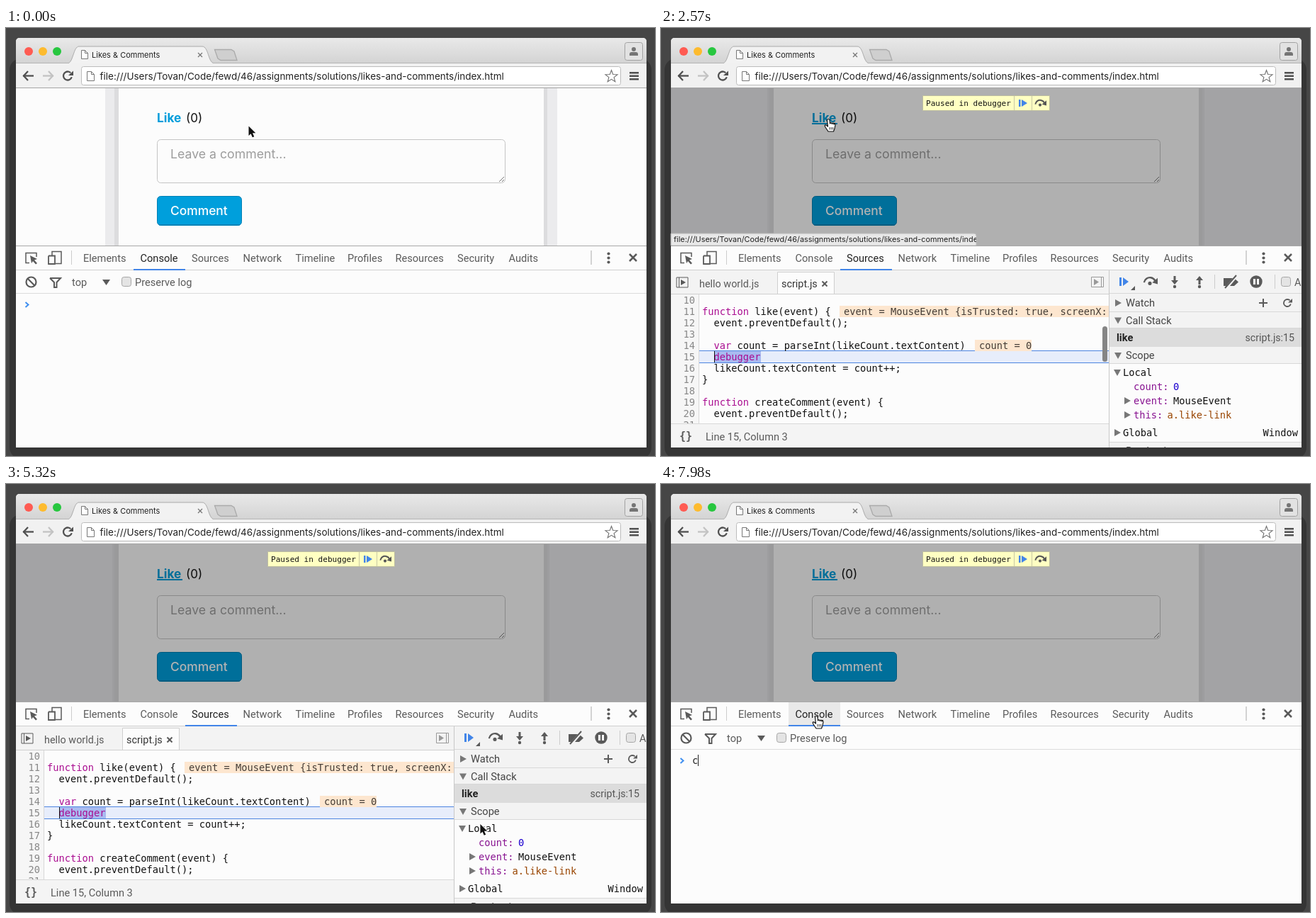
Animation, 916 px wide and 604 px high, one loop 8 s. Source, as an HTML page with a canvas:

```html
<!DOCTYPE html>
<html lang="en">
<head>
<meta charset="utf-8">
<title>Debugger walkthrough</title>
<style>
html, body { margin: 0; width: 100%; height: 100%; overflow: hidden; background: #464646; }
canvas { display: block; width: 916px; height: 604px; }
</style>
</head>
<body>
<canvas id="stage" width="916" height="604"></canvas>
<script>
const ctx = document.getElementById('stage').getContext('2d');
const LOOP = 8000, STEP = 88.66;
const INTER = 'Inter, sans-serif', UI = 'Roboto, sans-serif', MONO = '"DejaVu Sans Mono", monospace';
const GREY = '#5a5a5a', INK = '#303030', PURPLE = '#aa0d91', BLUE = '#4285e8';
const FOLDER = 'file:///Users/Tovan/Code/fewd/46/assignments/solutions/likes-and-comments/';
const SHORT_URL = '/Users/Tovan/Code/fewd/46/…/index.html';

// Pointer path: time, x, y
const PATH = [
  [0, 342, 138], [80, 348, 138], [170, 353, 140], [430, 353, 140], [520, 354, 127],
  [610, 354, 127], [1140, 237, 127], [3100, 237, 127], [3970, 128, 450], [4150, 136, 451],
  [4240, 138, 451], [4420, 720, 494], [5230, 720, 494], [5670, 203, 348],
  [5760, 203, 348], [6110, 220, 326], [LOOP, 220, 326]
];

const clamp = v => Math.max(0, Math.min(1, v));
const inside = (p, x0, y0, x1, y1) => p.x >= x0 && p.x < x1 && p.y >= y0 && p.y < y1;

function pointerAt(t) {
  const i = Math.max(1, PATH.findIndex(p => p[0] > t));
  const [t0, x0, y0] = PATH[i - 1], [t1, x1, y1] = PATH[i];
  const k = clamp((t - t0) / (t1 - t0)), e = k * k * (3 - 2 * k);
  return { x: x0 + (x1 - x0) * e, y: y0 + (y1 - y0) * e };
}

function rect(x, y, w, h, fill) { ctx.fillStyle = fill; ctx.fillRect(x, y, w, h); }

function box(x, y, w, h, r, fill, stroke) {
  ctx.beginPath();
  ctx.roundRect(x, y, w, h, r);
  if (fill) { ctx.fillStyle = fill; ctx.fill(); }
  if (stroke) { ctx.strokeStyle = stroke; ctx.lineWidth = 1; ctx.stroke(); }
}

function trace(points, closed) {
  ctx.beginPath();
  for (let i = 0; i < points.length; i += 2) ctx.lineTo(points[i], points[i + 1]);
  if (closed) ctx.closePath();
}

function poly(points, fill) { trace(points, true); ctx.fillStyle = fill; ctx.fill(); }

function line(points, color, width = 1) {
  trace(points);
  ctx.strokeStyle = color; ctx.lineWidth = width; ctx.stroke();
}

function arc(x, y, r, color, width, from = 0, to = Math.PI * 2) {
  ctx.beginPath(); ctx.arc(x, y, r, from, to);
  ctx.strokeStyle = color; ctx.lineWidth = width; ctx.stroke();
}

function dot(x, y, r, color) {
  ctx.beginPath(); ctx.arc(x, y, r, 0, Math.PI * 2); ctx.fillStyle = color; ctx.fill();
}

function text(s, x, y, size, family, color, weight = 400, align = 'left') {
  ctx.font = `${weight} ${size}px ${family}`;
  ctx.textAlign = align; ctx.fillStyle = color;
  ctx.fillText(s, x, y);
}

const ui = (s, x, y, color = GREY, size = 14.6, weight = 400, align = 'left') =>
  text(s, x, y, size, UI, color, weight, align);
const mono = (s, x, y, color = '#111', align = 'left') => text(s, x, y, 13.73, MONO, color, 400, align);

function code(s, x, y) {
  for (const part of s.split(/(function|var|debugger)/)) {
    mono(part, x, y, /^(function|var|debugger)$/.test(part) ? PURPLE : '#111');
    x += ctx.measureText(part).width;
  }
}

function clipped(x, y, w, h, draw) {
  ctx.save();
  ctx.beginPath(); ctx.rect(x, y, w, h); ctx.clip();
  draw();
  ctx.restore();
}

function cross(x, y, r, color, width) {
  line([x - r, y - r, x + r, y + r], color, width);
  line([x - r, y + r, x + r, y - r], color, width);
}

function triangle(x, y, open, color = '#777') {
  poly(open ? [x - 5, y - 4, x + 5, y - 4, x, y + 5] : [x - 4, y - 5, x + 5, y, x - 4, y + 5], color);
}

function reload(x, y, r, color, width) {
  arc(x, y, r, color, width, .3, 5.5);
  poly([x + r + 2, y - r - 1, x + r + 2, y - .5, x + 1, y - .5], color);
}

function page(x, y, w, h) {
  trace([x, y, x + w - 4, y, x + w, y + 4, x + w, y + h, x, y + h], true);
  ctx.fillStyle = '#fff'; ctx.fill();
  ctx.strokeStyle = '#777'; ctx.lineWidth = 1; ctx.stroke();
  line([x + w - 4, y, x + w - 4, y + 4, x + w, y + 4], '#777');
}

function checkbox(x, y) { box(x + .5, y + .5, 13, 13, 3, '#e4e4e4', '#a5a5a5'); }

function stepOver(x, y, s, color) {
  arc(x, y + 4 * s, 7.5 * s, color, 2.2 * s, Math.PI * 1.05, Math.PI * 1.85);
  poly([x + 10 * s, y - 3 * s, x + 10 * s, y + 5 * s, x + 3 * s, y + 3 * s], color);
  dot(x, y + 4 * s, 2.3 * s, color);
}

function play(x, y, color) {
  rect(x, y - 6, 3, 12, color);
  poly([x + 5, y - 6, x + 13, y, x + 5, y + 6], color);
}

function drawChrome() {
  rect(0, 0, 916, 604, '#464646');
  box(5, 43, 906, 565, 16, '#353535');
  const bar = ctx.createLinearGradient(0, 14, 0, 50);
  bar.addColorStop(0, '#e9e9e9'); bar.addColorStop(1, '#d3d3d3');
  box(14, 14, 890, 578, 5, '#fcfcfc');
  box(14, 14, 890, 37, [5, 5, 0, 0], bar);
  dot(32, 33, 6, '#ff5b52'); dot(52, 33, 6, '#fdbb2e'); dot(72, 33, 6, '#27c73f');
  rect(14, 49, 890, 1, '#b5b5b5');

  ctx.beginPath();
  ctx.moveTo(87, 50);
  ctx.bezierCurveTo(95, 49, 95, 26, 103, 26);
  ctx.lineTo(277, 26);
  ctx.bezierCurveTo(286, 26, 285, 49, 294, 50);
  ctx.fillStyle = '#f2f2f2'; ctx.fill();
  ctx.strokeStyle = '#aaa'; ctx.lineWidth = 1; ctx.stroke();
  page(106.5, 31.5, 9, 12);
  text('Likes & Comments', 121, 42, 11, INTER, '#222');
  cross(274, 38, 3, '#777', 1.3);

  trace([298, 30.5, 318, 30.5, 322, 33, 326, 45.5, 303, 45.5, 299, 43, 294.5, 30.5], true);
  ctx.fillStyle = '#cfcfcf'; ctx.fill(); ctx.strokeStyle = '#aaa'; ctx.stroke();
  box(873.5, 20.5, 25, 25, 3, '#e2e2e2', '#a2a2a2');
  dot(886, 30, 3, '#757575');
  box(880, 34, 12, 5, [3, 3, 0, 0], '#757575');

  rect(14, 50, 890, 34, '#f1f1f1');
  rect(14, 84, 890, 1, '#a5a5a5');
  for (const [x, c] of [[24, '#505050'], [67, '#c3c3c3']]) {
    const d = x < 40 ? 1 : -1;
    line([x, 67.5, x + 15 * d, 67.5], c, 2.3);
    line([x + 7 * d, 61, x + d, 67.5, x + 7 * d, 74], c, 2.3);
  }
  reload(87, 67.5, 6, '#505050', 2.3);
  box(106.5, 54.5, 761, 26, 3, '#fff', '#bcbcbc');
  page(114.5, 61.5, 10, 13);
  text(FOLDER + 'index.html', 132.5, 73, 13.5, INTER, '#222');
  const star = [];
  for (let i = 0; i < 10; i++) {
    const a = i * Math.PI / 5 - Math.PI / 2, r = i % 2 ? 3.8 : 9;
    star.push(854.5 + r * Math.cos(a), 68.5 + r * Math.sin(a));
  }
  trace(star, true); ctx.strokeStyle = '#707070'; ctx.lineWidth = 1.1; ctx.stroke();
  for (const y of [62, 66.5, 71]) rect(880, y, 13, 2.5, '#505050');
}

function drawPage(hover, paused) {
  const side = paused ? '#e9e9ec' : '#fcfcfc', edge = paused ? 9 : 19;
  rect(14, 85, 890, 222, side);
  rect(159 - edge, 85, edge, 222, paused ? '#e0e0e3' : '#ebebed');
  rect(759, 85, edge - (paused ? 1 : 0), 222, paused ? '#e0e0e3' : '#ebebed');
  rect(153, 85, 6, 222, '#dcdcde'); rect(759, 85, 5, 222, '#dcdcde');
  rect(159, 85, 600, 222, '#fcfcfc');
  text('Like', 213, 133, 17.3, INTER, '#009ddb', 700);
  if (hover) rect(213, 134, 36, 2, '#009ddb');
  text('(0)', 254, 133, 17, INTER, '#111');
  box(213.5, 157.5, 491, 61, 5, '#fcfcfc', '#c4c4c4');
  text('Leave a comment...', 232, 184, 17.7, INTER, '#9d9d9d');
  line([696, 217, 703, 210], '#777'); line([700, 217, 703, 214], '#777');
  box(213.5, 237.5, 119, 41, 5, '#009fdc', '#0080b5');
  rect(216, 277, 114, 1.5, '#0083b8');
  text('Comment', 232, 264, 17.4, INTER, '#fff', 500);
  if (!paused) return;
  rect(14, 85, 890, 222, 'rgba(0,0,0,.3)');
  box(369.5, 95.5, 179, 21, 0, '#ffffc2', '#bdbda0');
  text('Paused in debugger', 374, 110, 11.07, MONO, '#111');
  rect(498, 96, 1, 20, '#c8c8a4'); rect(523, 96, 1, 20, '#c8c8a4');
  rect(505, 101, 2.5, 10, BLUE);
  poly([509, 101, 517, 106, 509, 111], BLUE);
  stepOver(535, 105, .9, '#555');
}

function drawStatus(t) {
  if (t < 1110 || t >= 3440) return;
  const full = t >= 2540, right = !full ? 310 : t < 2630 ? 445 : 498;
  box(14, 290, right - 14, 17, [0, 3, 0, 0], '#e8e8e8', '#bbb');
  clipped(14, 290, right - 14, 17, () =>
    text(full ? FOLDER + 'index.html' : SHORT_URL, 18, 302, 10.9, INTER, '#222'));
}

function drawTabs(sources, mouse) {
  rect(14, 307, 890, 285, '#fcfcfc');
  rect(14, 307, 890, 1, '#a8a8a8');
  if (inside(mouse, 180, 308, 253, 341)) rect(180, 308, 73, 33, '#e9e9e9');
  rect(14, 341, 890, 1, '#d0d0d0');
  line([43, 323, 43, 317.5, 28, 317.5, 28, 331.5, 33, 331.5], GREY, 1.5);
  poly([34, 321, 44, 326, 40, 327.5, 44, 332, 42, 333.5, 38, 329, 36, 332], GREY);
  line([65, 321, 65, 315.5, 78, 315.5, 78, 332.5, 70, 332.5], GREY, 1.5);
  line([60, 321.5, 69, 321.5, 69, 333, 60, 333, 60, 321.5], GREY, 1.8);
  rect(92, 314, 1, 20, '#ccc');
  const names = ['Elements', 'Console', 'Sources', 'Network', 'Timeline', 'Profiles', 'Resources', 'Security', 'Audits'];
  const lefts = [109, 189.5, 262, 334.5, 408.5, 482, 549.5, 637, 709.5];
  const active = sources ? 2 : 1;
  names.forEach((name, i) => ui(name, lefts[i], 330, i === active ? '#222' : GREY));
  rect(sources ? 253 : 180, 340, 73, 2, BLUE);
  rect(825.5, 314, 1, 20, '#aaa');
  for (const y of [318.5, 324.5, 330.5]) dot(850.5, y, 2.1, GREY);
  cross(885, 324, 5, GREY, 2.5);
}

function drawConsole(t) {
  arc(35.5, 358.5, 7, GREY, 2.2);
  line([30.5, 353.5, 40.5, 363.5], GREY, 2.2);
  line([62, 353, 77, 353, 71.5, 359, 71.5, 366, 68, 366, 68, 359, 62, 353], GREY, 2);
  ui('top', 93, 364);
  poly([136, 355, 147, 355, 141.5, 363], GREY);
  checkbox(163, 351);
  ui('Preserve log', 182, 364);
  rect(14, 374, 890, 1, '#dcdcdc');
  line([27.5, 387, 31.5, 390.5, 27.5, 394], '#3f8ff0', 2);
  const typed = t >= 7950;
  if (typed) mono('c', 44, 395, '#222');
  const caret = t >= 50 && t < 490 || t >= 6790 && t < 7320 || t >= 7860;
  if (caret) rect(typed ? 52 : 44, 382, 1, 16, '#222');
}

function drawEditor(t, mouse) {
  rect(14, 342, 618, 33, '#f3f3f3');
  box(22, 352, 16, 14, 0, null, GREY);
  rect(25, 352, 1, 14, GREY);
  poly([28, 355, 35, 359, 28, 363], GREY);
  ui('hello world.js', 54, 366, GREY, 14.4);
  box(164.5, 344.5, 80, 31, 0, inside(mouse, 164, 344, 245, 375) ? '#e4e4e4' : '#fcfcfc', '#cfcfcf');
  ui('script.js', 170, 366, '#333', 14.4);
  cross(231, 361, 3.5, GREY, 2);
  box(607.5, 351.5, 17, 14, 0, null, '#999');
  poly([611, 354, 618, 358.5, 611, 363], '#999');
  rect(621, 352, 1, 14, '#999');
  rect(14, 375, 618, 1, '#d0d0d0');

  const values = t >= 2370;
  clipped(14, 376, 618, 182, () => {
    rect(14, 376, 39, 182, '#f6f6f6'); rect(53, 376, 1, 182, '#d8d8d8');
    rect(54, 456, 578, 16, '#e7edfb');
    rect(54, 455, 578, 1, '#4c84e0'); rect(54, 472, 578, 1, '#4c84e0');
    rect(75, 456, 66, 16, '#a8baf0');
    for (let n = 10; n < 22; n++) mono(n, 48, 389 + (n - 10) * 16, '#888', 'right');
    const lines = ['', 'function like(event) {', '  event.preventDefault();', '',
      '  var count = parseInt(likeCount.textContent)', '  debugger',
      '  likeCount.textContent = count++;', '}', '', 'function createComment(event) {',
      '  event.preventDefault();'];
    lines.forEach((s, i) => code(s, 58, 389 + i * 16));
    if (values) {
      rect(252, 392, 380, 16, '#fde6cf');
      mono('event = MouseEvent {isTrusted: true, screenX: 237', 258, 405, '#443d36');
      rect(443, 440, 80, 16, '#fde6cf');
      mono('count = 0', 449, 453, '#443d36');
    }
    if (Math.floor((t + 8 - 2110) / 532.5) % 2 === 0) rect(75, 456, 1, 16, '#111');
    ctx.globalAlpha = clamp((2930 - t) / 360);
    box(623, 421, 7, 50, 3.5, '#858585');
    ctx.globalAlpha = 1;
  });
  rect(14, 558, 618, 34, '#f4f4f4'); rect(14, 558, 618, 1, '#d8d8d8');
  text('{}', 26, 581, 15, MONO, GREY, 700);
  ui('Line 15, Column 3', 63, 582);
}

function header(y, h, name, open) {
  rect(633, y, 271, h, '#f3f3f3');
  rect(633, y + h - 1, 271, 1, '#d8d8d8');
  triangle(645, y + h / 2, open);
  ui(name, 656, y + h / 2 + 5, '#444');
}

function drawSidebar() {
  rect(632, 342, 1, 250, '#c8c8c8');
  rect(633, 342, 271, 33, '#f3f3f3'); rect(633, 374, 271, 1, '#d8d8d8');
  play(647, 358, BLUE);
  poly([669, 364, 669, 370, 663, 370], GREY);
  stepOver(690, 356, 1.1, GREY);
  rect(723.5, 350, 3, 8, GREY); poly([720, 356, 730, 356, 725, 362], GREY); dot(725, 365, 2.2, GREY);
  rect(758.5, 355, 3, 7, GREY); poly([755, 356, 765, 356, 760, 350], GREY); dot(760, 365, 2.2, GREY);
  rect(781, 348, 1, 20, '#ccc'); rect(866, 348, 1, 20, '#ccc');
  poly([794, 353, 809, 353, 815, 358.5, 809, 364, 794, 364], GREY);
  line([797, 368, 813, 349], '#f3f3f3', 4); line([796, 367, 812, 349], GREY, 2);
  dot(840, 358, 8.7, GREY); rect(836, 354, 3, 8, '#fff'); rect(841, 354, 3, 8, '#fff');
  checkbox(875, 351);
  clipped(890, 343, 14, 30, () => ui('Async', 894, 364));

  header(375, 26, 'Watch', false);
  line([844, 388, 856, 388], GREY, 2); line([850, 382, 850, 394], GREY, 2);
  reload(884, 388, 5, GREY, 1.8);
  header(401, 23, 'Call Stack', true);
  rect(633, 424, 271, 26, '#dcdcdc');
  ui('like', 643, 442, '#222', 14.6, 700);
  ui('script.js:15', 894, 442, '#555', 14.2, 400, 'right');
  header(450, 24, 'Scope', true);
  triangle(644, 486, true); mono('Local', 652, 491);
  mono('count:', 667, 511, '#881391'); mono('0', 723, 511, '#1c00cf');
  triangle(658, 526, false); mono('event:', 667, 531, '#881391'); mono('MouseEvent', 723, 531);
  triangle(658, 546, false); mono('this:', 667, 551, '#881391'); mono('a.like-link', 714.5, 551, '#994500');
  triangle(644, 571, false); mono('Global', 652, 576);
  mono('Window', 899, 576, '#111', 'right');
  clipped(633, 584, 271, 8, () => { rect(633, 584, 271, 1, '#d8d8d8'); header(585, 23, 'Breakpoints', true); });
}

function drawTooltip() {
  ctx.save();
  ctx.shadowColor = 'rgba(0,0,0,.3)'; ctx.shadowBlur = 5; ctx.shadowOffsetY = 2;
  box(194.5, 378.5, 533, 29, 2, '#fafafa');
  ctx.restore();
  box(194.5, 378.5, 533, 29, 2, null, '#c4c4c4');
  ui(FOLDER + 'script.js', 205, 398, '#333', 13);
}

function drawPointer({ x, y }, paused, sources) {
  const p = { x, y };
  const hand = inside(p, 213, 115, 250, 138) || inside(p, 100, 309, 632, 373);
  const beam = sources && inside(p, 54, 376, 632, 558) || !paused && inside(p, 213, 157, 705, 219);
  ctx.save();
  ctx.translate(x, y);
  ctx.lineJoin = 'round';
  if (hand) {
    ctx.beginPath();
    ctx.moveTo(-2.5, 3);
    ctx.quadraticCurveTo(-1, 0, 1, 3);
    ctx.lineTo(1.5, 8);
    for (const [cx, ex, ey] of [[3, 4.5, 8.5], [6, 7, 9], [8.5, 9, 10]]) ctx.quadraticCurveTo(cx, 5.5, ex, ey);
    ctx.lineTo(8, 15); ctx.lineTo(6.5, 19); ctx.lineTo(-1, 19);
    ctx.lineTo(-5, 13); ctx.quadraticCurveTo(-7, 9, -4, 10);
    ctx.lineTo(-1.5, 12); ctx.closePath();
    ctx.fillStyle = '#fff'; ctx.fill();
    ctx.strokeStyle = '#111'; ctx.lineWidth = 1.2; ctx.stroke();
    for (const fx of [1, 3.3, 5.6]) line([fx, 13, fx, 16.5], '#222', .9);
  } else if (beam) {
    const shape = [-3, -7, 0, -5.5, 0, 5.5, -3, 7];
    line(shape, '#222', 1.2);
    line([3, -7, 0, -5.5], '#222', 1.2); line([0, 5.5, 3, 7], '#222', 1.2);
    line([-2, 2, 2, 2], '#222', 1);
  } else {
    trace([.5, .5, .5, 14, 3.6, 11.2, 5.8, 16.3, 8.3, 15.2, 6, 10.3, 10.3, 10.2], true);
    ctx.strokeStyle = '#fff'; ctx.lineWidth = 2; ctx.stroke();
    ctx.fillStyle = '#111'; ctx.fill();
  }
  ctx.restore();
}

function render(time) {
  const t = Math.max(0, Math.floor((time + 9) / STEP) * STEP - 4);
  const mouse = pointerAt(t);
  const paused = t >= 1560, sources = t >= 2190 && t < 6790;
  drawChrome();
  drawPage(paused || inside(mouse, 213, 115, 250, 138), paused);
  drawStatus(t);
  drawTabs(sources, mouse);
  if (sources) { drawEditor(t, mouse); drawSidebar(); } else drawConsole(t);
  if (t >= 5640 && t < 5910) drawTooltip();
  if (t >= 1470 && t < 1560 || t >= 6700 && t < 6870) arc(mouse.x, mouse.y, 10.5, '#222', 1.2);
  drawPointer(mouse, paused, sources);
}

function tick(now) {
  render(now % LOOP);
  requestAnimationFrame(tick);
}
requestAnimationFrame(tick);
</script>
</body>
</html>
```
